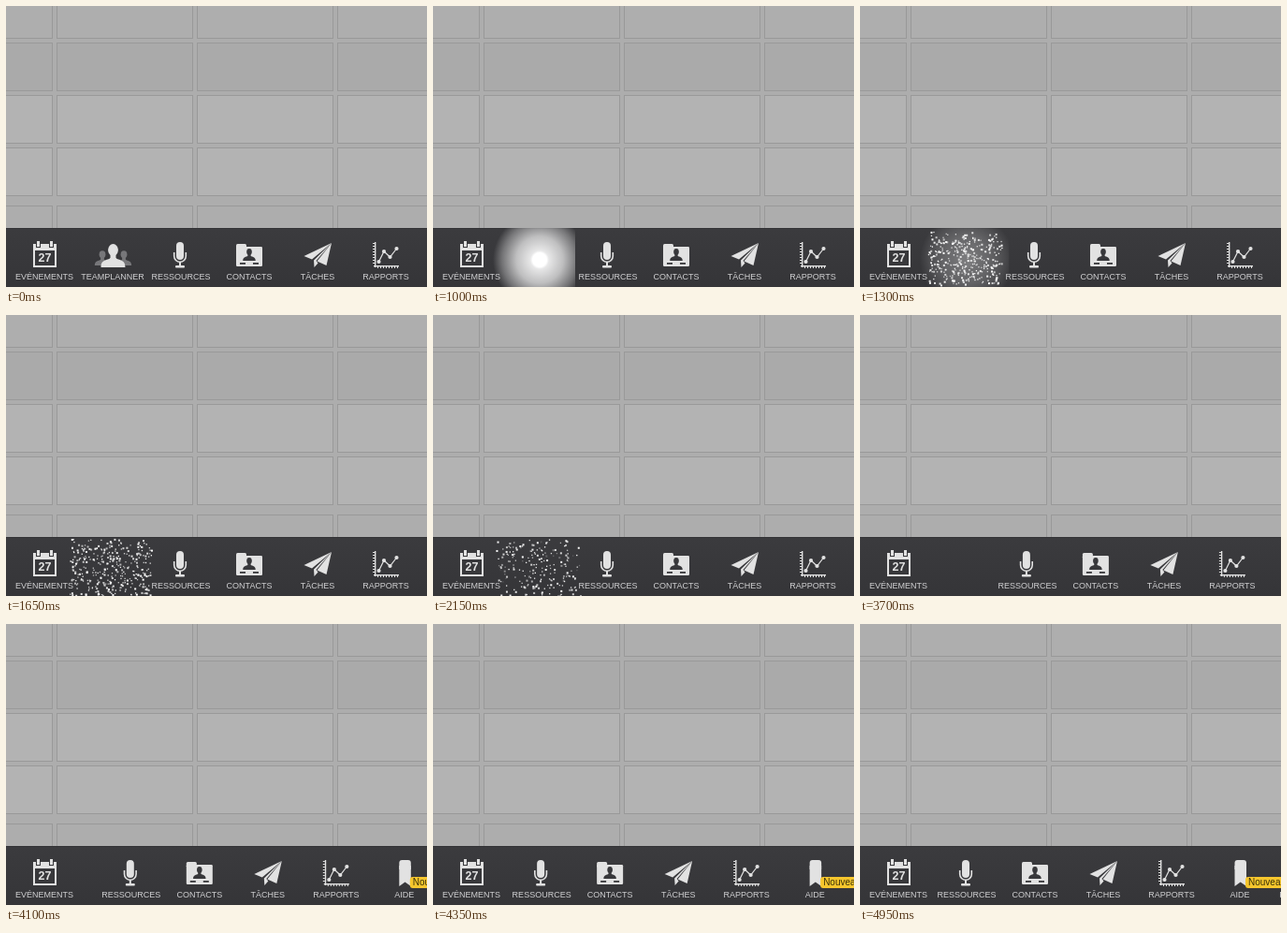
These frames come from a looping animation (450 by 300 pixels, 5.45 s). An HTML page with a canvas:

```html
<!DOCTYPE html>
<html lang="fr">
<head>
<meta charset="utf-8">
<title>Barre d'onglets</title>
<style>
html, body { margin: 0; width: 100%; height: 100%; overflow: hidden; background: #adadad; }
canvas { display: block; width: 450px; height: 300px; }
</style>
</head>
<body>
<canvas id="stage" width="450" height="300"></canvas>
<script>
const ctx = document.getElementById('stage').getContext('2d');
const LOOP = 5450, STEP = 50;
const BAR_TOP = 237, PITCH = 73;
const LIGHT = '#e2e2e2', DARK = '#38383b', LABEL = '#d0d0d2';
const FONT = '"Liberation Sans", Arial, sans-serif';

const clamp = v => Math.max(0, Math.min(1, v));
const easeInOut = p => p < .5 ? 2 * p * p : 1 - 2 * (1 - p) ** 2;

function rect(x, y, w, h, color) {
  ctx.fillStyle = color;
  ctx.fillRect(x, y, w, h);
}

function round(x, y, w, h, r, color) {
  ctx.fillStyle = color;
  ctx.beginPath();
  ctx.roundRect(x, y, w, h, r);
  ctx.fill();
}

function poly(points, color) {
  ctx.fillStyle = color;
  ctx.beginPath();
  points.forEach(([x, y]) => ctx.lineTo(x, y));
  ctx.fill();
}

function dot(x, y, rx, ry, color) {
  ctx.fillStyle = color;
  ctx.beginPath();
  ctx.ellipse(x, y, rx, ry, 0, 0, 7);
  ctx.fill();
}

function text(str, x, y, font, color, align = 'center') {
  ctx.font = font + ' ' + FONT;
  ctx.textAlign = align;
  ctx.fillStyle = color;
  ctx.fillText(str, x, y);
}

// Head and shoulders standing on a base line
function person(x, base, k, color) {
  dot(x, base - 18.5 * k, 5.4 * k, 6.5 * k, color);
  rect(x - 3 * k, base - 14 * k, 6 * k, 7 * k, color);
  ctx.beginPath();
  ctx.moveTo(x - 13 * k, base);
  ctx.bezierCurveTo(x - 13 * k, base - 9 * k, x - 6 * k, base - 7 * k, x - 3 * k, base - 10 * k);
  ctx.lineTo(x + 3 * k, base - 10 * k);
  ctx.bezierCurveTo(x + 6 * k, base - 7 * k, x + 13 * k, base - 9 * k, x + 13 * k, base);
  ctx.fill();
}

// Icons are drawn around x = 0, in stage y
function calendar() {
  rect(-12, 254, 25, 25, LIGHT);
  rect(-10, 261, 21, 16, DARK);
  for (const x of [-8, 6]) {
    rect(x - 1, 253, 5, 5, DARK);
    rect(x, 251, 3, 6, LIGHT);
  }
  text('27', .5, 273.3, 'bold 12.5px', LIGHT);
}

function team() {
  person(-11, 277, .63, '#77777a');
  person(12, 277, .63, '#77777a');
  person(.5, 279, 1, LIGHT);
}

function mic() {
  round(-5, 252, 8, 19, 4, LIGHT);
  ctx.strokeStyle = LIGHT;
  ctx.lineWidth = 1.6;
  ctx.beginPath();
  ctx.moveTo(-7.3, 263);
  ctx.lineTo(-7.3, 267);
  ctx.arc(-1, 267, 6.3, Math.PI, 0, true);
  ctx.lineTo(5.3, 263);
  ctx.stroke();
  rect(-2, 273, 2, 5, LIGHT);
  round(-6, 277, 10, 2.4, 1, LIGHT);
}

function folder() {
  round(-14, 254, 11, 6, 1.5, LIGHT);
  round(-14, 257, 28, 21, 1.2, LIGHT);
  person(0, 272, .52, DARK);
  rect(-10, 274, 6, 1.8, DARK);
  rect(4, 274, 6, 1.8, DARK);
}

function plane() {
  poly([[15, 253], [-14.5, 267], [-6, 270.5]], LIGHT);
  poly([[15, 253], [9.5, 277], [-.5, 272.5]], LIGHT);
  poly([[15, 253], [-4, 271.5], [-3.5, 279], [.5, 274.5], [-1.5, 272]], LIGHT);
}

function chart() {
  rect(-12, 252, 1.4, 27, LIGHT);
  rect(-13, 277, 27, 1.4, LIGHT);
  for (let i = 0; i < 8; i++) {
    rect(-14, 253 + i * 3, 2, 1, LIGHT);
    rect(-9 + i * 3, 278, 1, 2, LIGHT);
  }
  const pts = [[-7.5, 273], [-2, 262], [4.5, 268], [11.5, 259]];
  ctx.strokeStyle = LIGHT;
  ctx.lineWidth = 1.2;
  ctx.beginPath();
  pts.forEach(([x, y]) => ctx.lineTo(x, y));
  ctx.stroke();
  pts.forEach(([x, y]) => dot(x, y, 2.1, 2.1, LIGHT));
}

function bookmark() {
  round(-5.5, 252, 12.5, 10, [3, 3, 0, 0], LIGHT);
  poly([[-5.5, 258], [7, 258], [7, 280], [.7, 275.5], [-5.5, 280]], LIGHT);
  round(6, 270, 44, 12, 3, '#f6c62d');
  text('Nouveau', 9, 279.4, '10px', '#3a3108', 'left');
}

const items = [
  ['EVÉNEMENTS', calendar],
  ['TEAMPLANNER', team],
  ['RESSOURCES', mic],
  ['CONTACTS', folder],
  ['TÂCHES', plane],
  ['RAPPORTS', chart],
  ['AIDE', bookmark],
  ['PARAMÈTRES', () => {}]
];

function drawItem(i, shift) {
  const [label, icon] = items[i];
  ctx.save();
  ctx.translate(41 + i * PITCH - shift, 0);
  text(label, 0, 292, '9px', LABEL);
  icon();
  ctx.restore();
}

function drawGrid() {
  rect(0, 0, 450, BAR_TOP, '#adadad');
  const rows = [[-17, '#aeaeae'], [39, '#aaaaaa'], [95, '#b3b3b3'], [151, '#b3b3b3'], [213, '#adadad']];
  ctx.lineWidth = 1;
  ctx.strokeStyle = '#999';
  for (const [y, color] of rows) {
    for (let x = -96; x < 450; x += 150) {
      rect(x, y, 146, 52, color);
      ctx.strokeRect(x + .5, y + .5, 145, 51);
    }
  }
}

function drawBar() {
  const g = ctx.createLinearGradient(0, BAR_TOP, 0, 300);
  g.addColorStop(0, '#3b3b3e');
  g.addColorStop(1, '#353538');
  rect(0, BAR_TOP, 450, 63, g);
  rect(0, BAR_TOP, 450, 1, '#323235');
}

let seed = 27;
function rnd() {
  seed = (seed * 16807) % 2147483647;
  return seed / 2147483647;
}

const CX = 114, CY = 271;
const sparks = Array.from({ length: 340 }, () => ({
  x: 69 + rnd() * 85 + (rnd() - .5) * 4,
  y: 238 + rnd() * 61,
  dx: (rnd() - .5) * 14,
  dy: (rnd() - .5) * 14,
  size: rnd() < .4 ? 2 : 1.3,
  tone: .6 + rnd() * .4,
  end: 1650 + 1180 * rnd() ** 1.25
}));

function drawFlash(t) {
  const p = (t - 1000) / 500;
  if (p < 0 || p >= 1) return;
  ctx.save();
  ctx.beginPath();
  ctx.rect(62, BAR_TOP, 90 + 12 * p, 63);
  ctx.clip();
  ctx.globalAlpha = (1 - p) ** 1.2;
  const g = ctx.createRadialGradient(CX, CY, 0, CX, CY, 50);
  g.addColorStop(0, '#fff');
  g.addColorStop(.15, '#fff');
  g.addColorStop(.2, 'rgba(255,255,255,.88)');
  g.addColorStop(.5, 'rgba(255,255,255,.68)');
  g.addColorStop(.8, 'rgba(255,255,255,.3)');
  g.addColorStop(1, 'rgba(255,255,255,0)');
  rect(60, BAR_TOP, 105, 63, g);
  ctx.restore();
}

function drawSparks(t) {
  if (t <= 1000 || t >= 2850) return;
  const spread = 1 - (1 - clamp((t - 1000) / 450)) ** 2;
  const drift = (t - 1650) / 1000;
  for (const s of sparks) {
    const alpha = s.tone * clamp((s.end - t) / 120 + 1) * clamp((t - 1000) / 200);
    if (alpha <= 0) continue;
    const x = CX + (s.x + s.dx * drift - CX) * spread;
    const y = CY + (s.y + s.dy * drift - CY) * spread;
    if (y < BAR_TOP) continue;
    ctx.globalAlpha = alpha;
    rect(x, y, s.size, s.size, '#fff');
  }
  ctx.globalAlpha = 1;
}

function draw(now) {
  const t = Math.floor(now % LOOP / STEP) * STEP;
  const shift = PITCH * easeInOut(clamp((t - 3462) / 1010));
  drawGrid();
  drawBar();
  items.forEach((_, i) => {
    if (i !== 1) drawItem(i, i ? shift : 0);
    else if (t < 1000) drawItem(i, 0);
  });
  drawFlash(t);
  drawSparks(t);
}

const start = performance.now();
function tick() {
  draw(performance.now() - start);
  requestAnimationFrame(tick);
}
tick();
</script>
</body>
</html>
```
